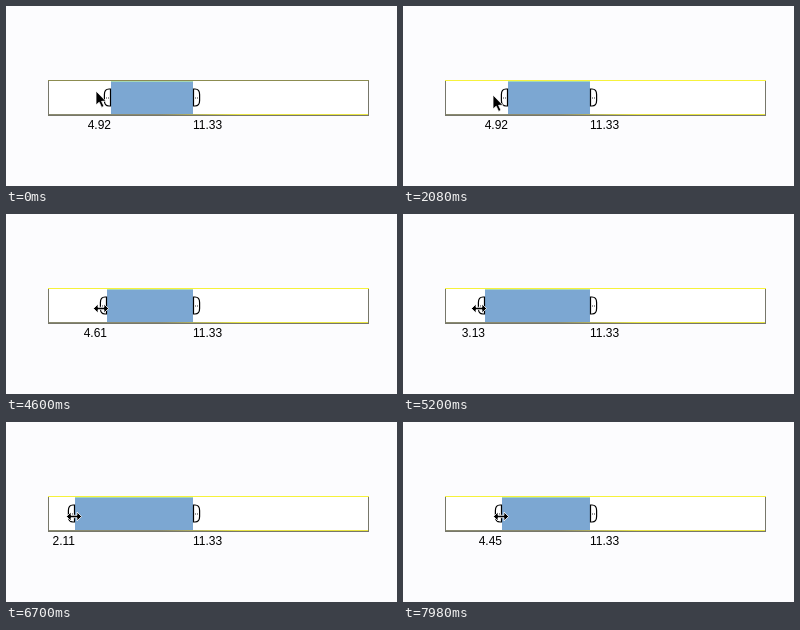
An HTML page for the animation above (8000 ms loop, 391 by 180 pixels).

```html
<!DOCTYPE html>
<html lang="en">
<head>
<meta charset="utf-8">
<title>Range slider</title>
<style>
  html, body { margin: 0; width: 100%; height: 100%; overflow: hidden; background: #fcfcfe; }
  svg { display: block; }
  text { font: 12px "Liberation Sans", Arial, sans-serif; fill: #000; }
  .edge { shape-rendering: crispEdges; }
</style>
</head>
<body>
<svg width="391" height="180" viewBox="0 0 391 180">
  <defs>
    <g id="knob">
      <path d="M.5 83H2Q6.6 83 6.6 88.5V94.5Q6.6 100 2 100H.5Z"
            fill="#fff" stroke="#000" stroke-width="1.2"/>
      <path d="M2 92h1M4 92h1" stroke="#333"/>
    </g>
    <linearGradient id="shade" x1="0" x2="1">
      <stop offset=".35" stop-color="#8a8a70"/>
      <stop offset=".6" stop-color="#e8e444"/>
    </linearGradient>
  </defs>
  <g class="edge">
    <rect x="42" y="74" width="321" height="36" fill="#fff"/>
    <rect id="bar" y="75" height="33" fill="#7ca7d2"/>
    <rect id="rim" y="75" height="1" fill="#a4d8b8"/>
    <rect id="top" x="42" y="74" width="321" height="1"/>
    <rect x="42" y="108" width="321" height="1" fill="url(#shade)"/>
    <path d="M42.5 75V109.5H362.5V75" fill="none" stroke="#77776a"/>
  </g>
  <use id="left" href="#knob"/>
  <use href="#knob" x="187"/>
  <text id="low" y="123" text-anchor="end"></text>
  <text id="high" x="187" y="123"></text>
  <path id="arrow" d="M0 0V14L3.2 11.2L5.6 16.4L8 15.3L5.6 10.3H10Z"
        stroke="#fff" stroke-width=".8"/>
  <path id="resize" d="M-7.5 0L-3-4.5V-1.2H3V-4.5L7.5 0L3 4.5V1.2H-3V4.5Z"
        stroke="#fff" stroke-width=".8"/>
</svg>
<script>
const LOOP = 8000, START = 42, UNIT = 12.8, END = 145;
const $ = id => document.getElementById(id);

// Smooth 0..1 progress between two times
function ease(t, from, to) {
  const u = Math.min(1, Math.max(0, (t - from) / (to - from)));
  return u * u * u * (10 - 15 * u + 6 * u * u);
}

function set(id, attrs) {
  for (const name in attrs) $(id).setAttribute(name, attrs[name]);
}

const label = px => (px / UNIT).toFixed(2);

function draw(t) {
  // Drag left twice, then back to the right
  const px = Math.round(63 - 23 * ease(t, 4360, 5160) - 20 * ease(t, 5220, 5960)
    + 37 * ease(t, 6300, 7580));
  const x = START + px;

  // The pointer nears the handle, then holds it with a slowly shifting grip
  const reach = ease(t, 2500, 3080);
  const cx = t < 4360 ? 90 + 9 * reach : x - 6 + 5 * ease(t, 5300, 6000);
  const cy = 85 + 4 * ease(t, 20, 720) + 5.5 * reach;
  const resizing = reach > .8;

  for (const id of ["bar", "rim"]) set(id, { x, width: END - px });
  set("left", { transform: `translate(${x} 0) scale(-1 1)` });
  set("low", { x });
  $("low").textContent = label(px);
  set("top", { fill: t < 20 ? "#8c8c50" : "#f6f23c" });

  const transform = `translate(${cx} ${cy})`;
  set("arrow", { transform, visibility: resizing ? "hidden" : "visible" });
  set("resize", { transform, visibility: resizing ? "visible" : "hidden" });
}

$("high").textContent = label(END);
const began = performance.now();
function frame() {
  draw((performance.now() - began) % LOOP);
  requestAnimationFrame(frame);
}
frame();
</script>
</body>
</html>
```
